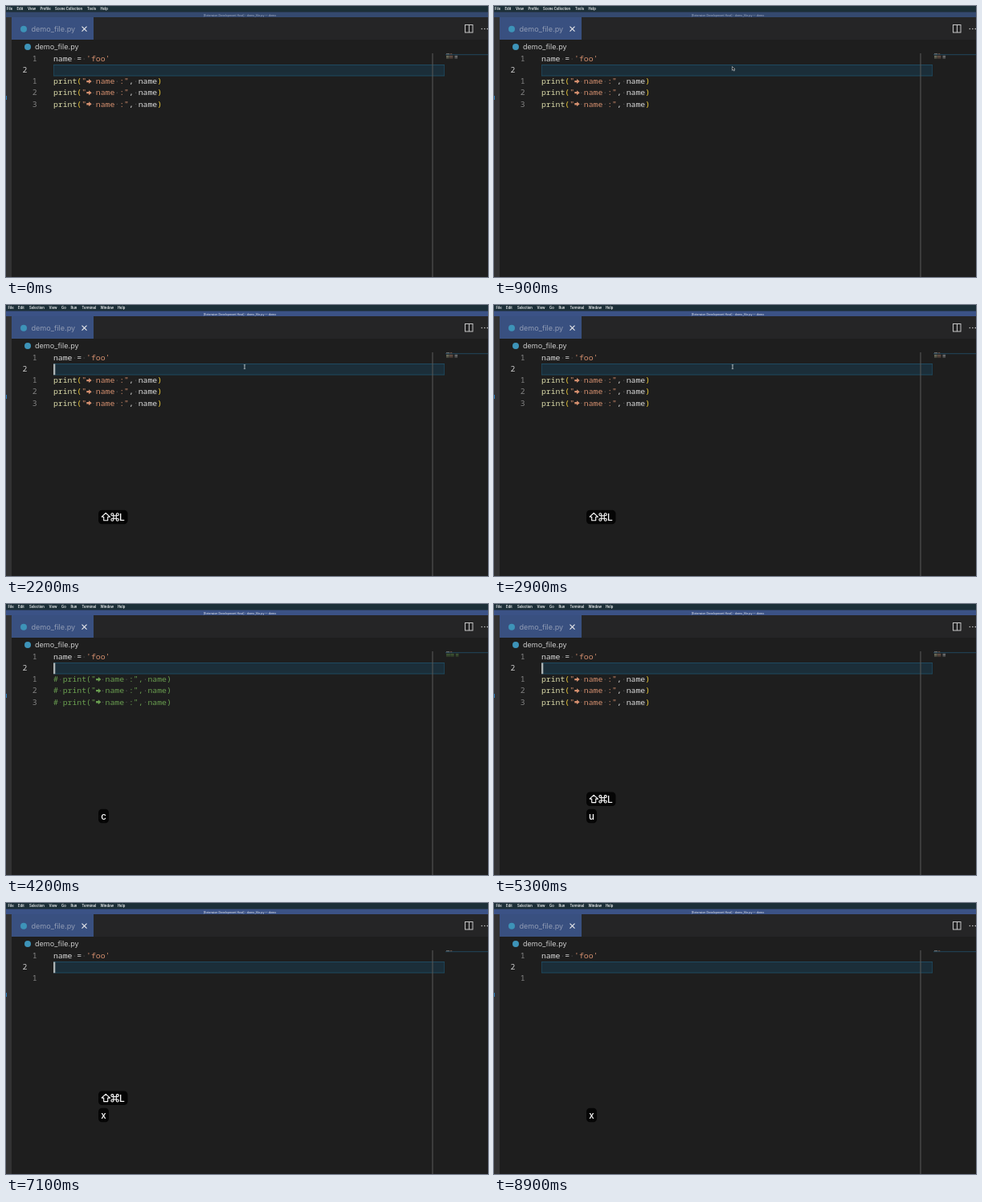
Animation of 600 by 338 pixels, one loop 9 s. Source, as an HTML page with a canvas:

```html
<!DOCTYPE html>
<html lang="en">
<head>
<meta charset="utf-8">
<title>Editor demo</title>
<style>
  html, body { margin: 0; width: 100%; height: 100%; overflow: hidden; background: #1e1e1e; }
  canvas { display: block; width: 600px; height: 338px; }
</style>
</head>
<body>
<canvas id="stage" width="600" height="338"></canvas>
<script>
const ctx = document.getElementById('stage').getContext('2d');
const LOOP = 9000, FOCUS = 1000, COMMENT = 3000, UNCOMMENT = 5000, REMOVE = 7000;
const SANS = 'Inter, Roboto, sans-serif';
const CODE = '9.78px "Noto Sans Mono", "DejaVu Sans Mono", monospace';
const CELL = 5.87, LEFT = 59, LINE = 14.05;
const COLORS = { text: '#dcdcdc', call: '#dcdcaa', paren: '#f2cf3a', string: '#d6906f', comment: '#6a9f50' };

const KEYS = [
  { at: 1900, label: 'chord' }, { at: 3000, label: 'c' },
  { at: 4400, label: 'chord' }, { at: 5000, label: 'u' },
  { at: 6400, label: 'chord' }, { at: 7000, label: 'x' }
];
const LINGER = 1900, FADE = 200;

const RECORDER_MENU = [['File', 1], ['Edit', 13.5], ['View', 27], ['Profile', 42.5],
  ['Scene Collection', 61], ['Tools', 101], ['Help', 117.5]];
const EDITOR_MENU = [['File', 2.5], ['Edit', 15], ['Selection', 29], ['View', 53.5], ['Go', 69],
  ['Run', 80.5], ['Terminal', 94.5], ['Window', 117.5], ['Help', 139]];

function rect(x, y, w, h, color) {
  ctx.fillStyle = color;
  ctx.fillRect(x, y, w, h);
}

function text(string, x, y, font, color, align = 'left') {
  ctx.font = font;
  ctx.textAlign = align;
  ctx.fillStyle = color;
  ctx.fillText(string, x, y);
}

function polygon(points, color) {
  ctx.beginPath();
  points.forEach(([x, y]) => ctx.lineTo(x, y));
  ctx.closePath();
  ctx.fillStyle = color;
  ctx.fill();
}

function stroke(points, color, width) {
  ctx.beginPath();
  points.forEach(([x, y], i) => i ? ctx.lineTo(x, y) : ctx.moveTo(x, y));
  ctx.strokeStyle = color;
  ctx.lineWidth = width;
  ctx.stroke();
}

function disc(x, y, r, color) {
  ctx.beginPath();
  ctx.arc(x, y, r, 0, Math.PI * 2);
  ctx.fillStyle = color;
  ctx.fill();
}

function drawChrome(focused) {
  rect(0, 0, 600, 338, '#1e1e1e');
  rect(0, 0, 600, 7.5, '#1c2f38');
  rect(0, 7.5, 600, 6.5, focused ? '#3b5286' : '#34496f');
  rect(0, 14, 7, 324, '#323233');
  rect(0, 112, 1, 5, '#2a7fc0');
  rect(7, 14, 593, 28, '#252526');
  rect(7, 14, 102, 28, '#395080');

  for (const [label, x] of focused ? EDITOR_MENU : RECORDER_MENU)
    text(label, x, 5.1, `600 4.2px ${SANS}`, '#f2f4f5');
  text('[Extension Development Host] - demo_file.py — demo', 291, 12.5,
    `500 3.5px ${SANS}`, focused ? '#d5dbe8' : '#98a5bf', 'center');

  disc(22, 28.7, 4, '#3d93b8');
  text('demo_file.py', 31.5, 32, `9.1px ${SANS}`, '#8f9ab3');
  stroke([[94.5, 25.7], [100.5, 31.7]], '#f0f0f0', 1.1);
  stroke([[100.5, 25.7], [94.5, 31.7]], '#f0f0f0', 1.1);
  disc(27, 51, 4, '#3d93b8');
  text('demo_file.py', 36, 54.3, `9.1px ${SANS}`, '#c8c8c8');

  ctx.strokeStyle = '#c5c5c5';
  ctx.lineWidth = 1;
  ctx.strokeRect(571.5, 23.5, 9.5, 9.5);
  stroke([[576.5, 23.5], [576.5, 33]], '#c5c5c5', 1);
  for (const x of [592.3, 595.8, 599.3]) disc(x, 28.5, 0.8, '#c5c5c5');
}

// Spaces appear as faint dots; an arrow fills exactly one cell.
function drawCode(parts, row) {
  const y = 69.3 + row * LINE;
  let x = LEFT;
  for (const [string, color] of parts) {
    for (const char of string) {
      if (char === ' ') {
        disc(x + CELL / 2, y - 3.3, 0.55, '#626262');
      } else if (char === '→') {
        const m = y - 3.3;
        polygon([[x + 0.2, m - 1.2], [x + 3, m - 1.2], [x + 3, m - 3], [x + 6.6, m],
          [x + 3, m + 3], [x + 3, m + 1.2], [x + 0.2, m + 1.2]], color);
      } else {
        text(char, x, y, CODE, color);
      }
      x += CELL;
    }
  }
}

function drawEditor(t) {
  const { text: plain, call, paren, string, comment } = COLORS;
  const commented = t >= COMMENT && t < UNCOMMENT;
  const removed = t >= REMOVE;
  const printLine = commented
    ? [['# print("→ name :", name)', comment]]
    : [['print', call], ['(', paren], ['"→ name :"', string], [', name', plain], [')', paren]];

  rect(59, 73, 487, 14.5, '#1f4a60');
  rect(59.7, 74, 485.6, 12.5, '#1b2e39');
  rect(530.5, 59, 1, 279, '#5a5a5a');

  drawCode([['name = ', plain], ["'foo'", string]], 0);
  if (!removed) for (let row = 2; row < 5; row++) drawCode(printLine, row);

  const numbers = removed ? [1, 2, 1] : [1, 2, 1, 2, 3];
  numbers.forEach((n, row) => row === 1
    ? text(n, 20.6, 69.3 + LINE, CODE, '#d0d0d0')
    : text(n, 38.6, 69.3 + row * LINE, CODE, '#858585', 'right'));

  if (t >= FOCUS && t % 1000 < 500) rect(59, 73.5, 2.3, 13.7, '#aeb4b5');
  drawMinimap(removed, commented);
}

function drawMinimap(removed, commented) {
  rect(547, 60.2, 53, 1, '#21465c');
  rect(548, 59.3, 4, 0.9, '#858585');
  rect(552.8, 59.3, 2.5, 0.9, '#795d4f');
  if (removed) return;
  const inks = commented ? ['#466438', '#466438', '#466438'] : ['#85856d', '#795d4f', '#858585'];
  const shift = commented ? 1.3 : 0;
  for (let row = 0; row < 3; row++) {
    const y = 61.8 + row * 1.4;
    rect(548, y, 3.6 + shift, 0.8, inks[0]);
    rect(552 + shift, y, 4.4, 0.8, inks[1]);
    rect(558.5 + shift, y, 3.6, 0.8, inks[2]);
  }
}

function drawChord(y) {
  const top = [[118.9, y - 0.2], [124.2, y - 5], [129.5, y - 0.2], [126.7, y - 0.2],
    [126.7, y + 4.3], [121.7, y + 4.3], [121.7, y - 0.2], [118.9, y - 0.2]];
  ctx.lineJoin = 'round';
  stroke(top, '#fff', 1.1);
  ctx.lineJoin = 'miter';
  ctx.strokeRect(133.8, y - 1.7, 3.5, 3.5);
  for (const sx of [-1, 1]) for (const sy of [-1, 1]) {
    ctx.beginPath();
    ctx.arc(135.55 + sx * 3.2, y + sy * 3.2, 1.5, 0, Math.PI * 2);
    ctx.stroke();
  }
  text('L', 141, y + 4.3, `500 12px ${SANS}`, '#fff');
}

function drawKeys(t) {
  const pressed = KEYS.filter(key => key.at <= t);
  pressed.forEach(({ at, label }, i) => {
    const alpha = Math.min(1, 1 - (t - at - LINGER) / FADE);
    if (alpha <= 0) return;
    const chord = label === 'chord';
    const y = 264.5 - (pressed.length - 1 - i) * 21.2;
    ctx.globalAlpha = alpha;
    ctx.beginPath();
    ctx.roundRect(115, y - 8.8, chord ? 36.5 : 13, 17.6, 4.5);
    ctx.fillStyle = '#050505';
    ctx.fill();
    if (chord) drawChord(y);
    else text(label, 121.5, y + 4.4, `500 11.5px ${SANS}`, '#fff', 'center');
    ctx.globalAlpha = 1;
  });
}

function drawPointer(t) {
  if (t < 100 || t >= COMMENT) return;
  if (t >= FOCUS) {
    stroke([[297, 74.8], [297, 79.5]], '#c9d0d3', 0.9);
    stroke([[295.8, 74.6], [298.2, 74.6]], '#c9d0d3', 0.6);
    stroke([[295.8, 79.6], [298.2, 79.6]], '#c9d0d3', 0.6);
    return;
  }
  const left = Math.pow(1 - Math.min(1, (t - 100) / 700), 3);
  const x = 296.5 + 304 * left, y = 75.5 + 25 * left;
  const arrow = [[x, y], [x, y + 4.8], [x + 1.2, y + 3.8], [x + 2.2, y + 5.6],
    [x + 2.9, y + 5.2], [x + 2.1, y + 3.5], [x + 3.6, y + 3.4]];
  polygon(arrow, '#101010');
  stroke([...arrow, arrow[0]], '#d5dadd', 0.6);
}

function render(now) {
  const t = now % LOOP;
  drawChrome(t >= FOCUS);
  drawEditor(t);
  drawKeys(t);
  drawPointer(t);
}

const start = performance.now();
function tick() {
  render(performance.now() - start);
  requestAnimationFrame(tick);
}
tick();
</script>
</body>
</html>
```
